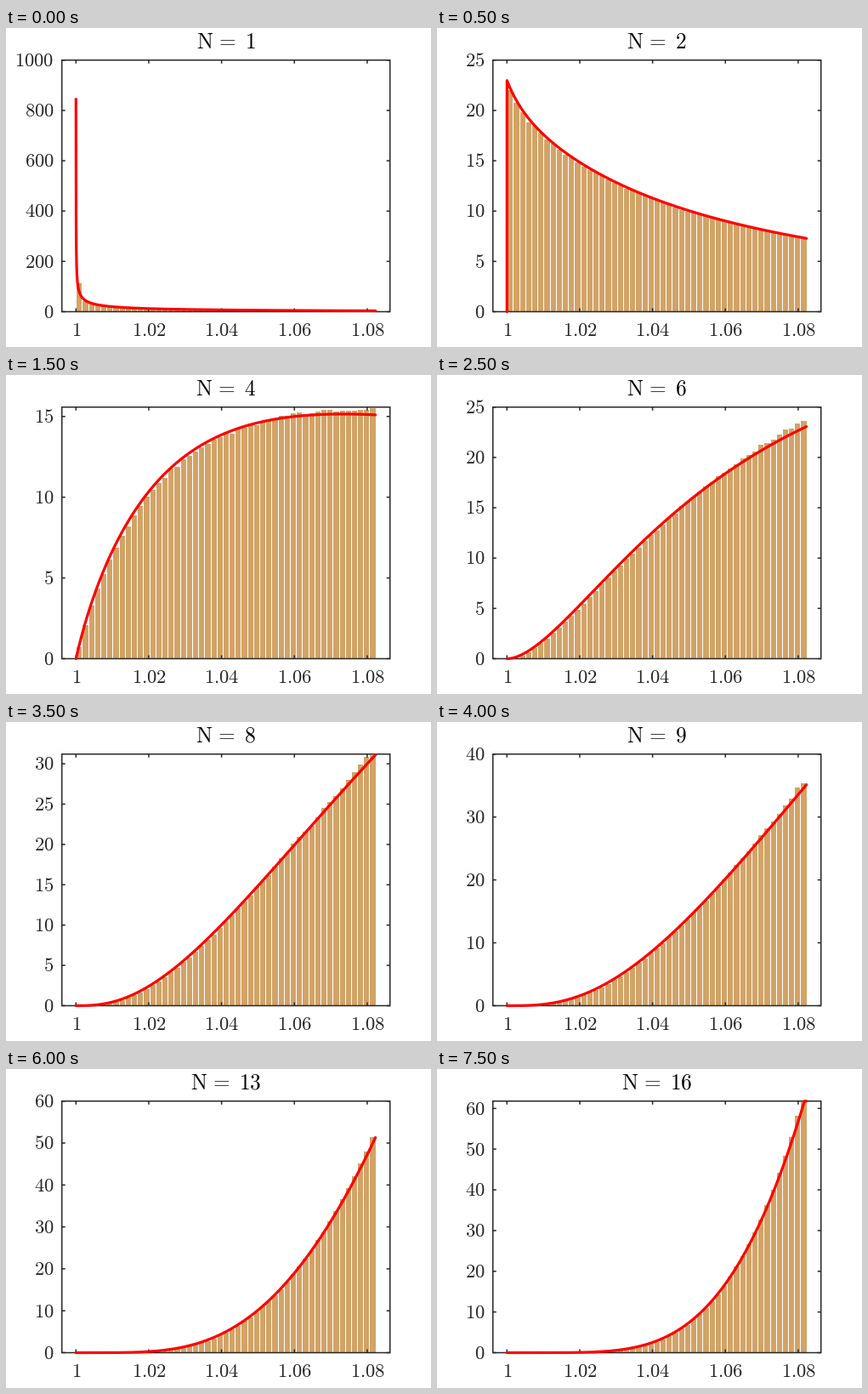
A matplotlib script for the animation above (8 s loop, 500x375 px).

```python
import numpy as np
import matplotlib.pyplot as plt
from matplotlib.animation import FuncAnimation
from matplotlib.patches import Rectangle

plt.rcParams["mathtext.fontset"] = "cm"

W, H, DPI = 500, 375, 100
PX = 72 / DPI
LEFT, RIGHT, TOP, BOTTOM = 65.75, 451.75, 37.75, 333.5
X_ONE, X_SCALE = 82.3, 4283
SPAN, BINS = 0.08227, 49
DARK, TAN, RED = "#262626", "#d2a366", "#ff0000"
BEND = 0.19

# upper limit and tick step of the vertical axis for each N
Y_AXES = {
    1: (1000, 200), 2: (25, 5), 3: (15, 5), 4: (15.58, 5),
    5: (20, 5), 6: (25, 5), 7: (30, 5), 8: (31.2, 5),
    9: (40, 10), 10: (40, 10), 11: (50, 10), 12: (50, 10),
    13: (60, 10), 14: (60, 10), 15: (60, 10), 16: (61.8, 10),
}


def base_density(t):
    """Density for N = 2 at distance t above 1."""
    return 1 / (0.048 + 0.98 * t + 1.5 * t**2 - 0.004 * np.exp(-t / 0.005))


# fine grid, denser near zero
t = SPAN * np.linspace(0, 1, 3001) ** 2
base = base_density(t)
cum = np.concatenate([[0], np.cumsum(np.diff(t) * (base[1:] + base[:-1]) / 2)])
base /= cum[-1]
cum /= cum[-1]
# squared radius, scaled to reach 1 at the end of the span
g = (1 - np.sqrt(1 - 2 * BEND * (1 - BEND / 2) * cum)) / BEND


def norm(n):
    return 1 / (2 / n - 2 * BEND / (n + 2))


def curve(n):
    """Points of the density line."""
    keep = t > 8.6e-6
    y = norm(n) / norm(2) * g[keep] ** (n / 2 - 1) * base[keep]
    if n == 1:
        return np.append(0, t[keep]), np.append(845, np.minimum(y, 845))
    return np.append(0, t[keep]), np.append(0, y)


def bars(n):
    """Bin edges and sampled histogram heights."""
    edges = np.linspace(0, SPAN, BINS + 1)
    ge = np.interp(edges, t, g)
    cdf = norm(n) * (2 / n * ge ** (n / 2) - 2 * BEND / (n + 2) * ge ** (n / 2 + 1))
    rng = np.random.default_rng(n)
    tilt = 0.033 * min(1, (n - 1) / 4) * np.linspace(-1, 1, BINS)
    noise = rng.normal(0, 0.005, BINS)
    return edges, np.diff(cdf) / np.diff(edges) * (1 + tilt + noise)


def to_x(v):
    return X_ONE + X_SCALE * v


fig = plt.figure(figsize=(W / DPI, H / DPI), dpi=DPI, facecolor="white")
ax = fig.add_axes([0, 0, 1, 1])


def segment(xs, ys):
    ax.plot(xs, ys, color=DARK, lw=1.5 * PX, solid_capstyle="butt",
            snap=False, zorder=3)


def label(x, y, text, ha, em=22.5, color=DARK):
    ax.text(x, y, f"${text}$", ha=ha, va="baseline", fontsize=em * PX, color=color)


def draw(i):
    n = i + 1
    limit, step = Y_AXES[n]

    def to_y(v):
        return BOTTOM - (BOTTOM - TOP) * np.minimum(v, limit) / limit

    ax.clear()
    ax.set(xlim=(0, W), ylim=(H, 0))
    ax.axis("off")

    edges, heights = bars(n)
    tops = to_y(heights)
    ax.bar(to_x(edges[:-1]), tops - BOTTOM, np.diff(edges) * X_SCALE, bottom=BOTTOM,
           align="edge", color=TAN, edgecolor="white", linewidth=1 * PX, zorder=2)

    ax.add_patch(Rectangle((LEFT, TOP), RIGHT - LEFT, BOTTOM - TOP, fill=False,
                           ec=DARK, lw=1.5 * PX, snap=False, zorder=3))
    for k in range(5):
        x = to_x(0.02 * k)
        segment([x, x], [BOTTOM, BOTTOM - 4])
        segment([x, x], [TOP, TOP + 4])
        label(x + 0.2, 362.5, f"{1 + 0.02 * k:.2f}" if k else "1", "center")
    for v in range(0, int(limit) + 1, step):
        y = to_y(v)
        segment([LEFT, LEFT + 4], [y, y])
        segment([RIGHT, RIGHT - 4], [y, y])
        label(56.5, y + 7.3, str(v), "right")

    tx, ty = curve(n)
    ax.plot(to_x(tx), to_y(ty), color=RED, lw=3.2 * PX, solid_capstyle="round",
            solid_joinstyle="round", zorder=4)

    label(258.8, 24, rf"\mathrm{{N}}\hspace{{0.13}}=\hspace{{0.3}}{n}",
          "center", 25.4, "black")
    return []


anim = FuncAnimation(fig, draw, frames=16, interval=500, init_func=lambda: [],
                     repeat=True, repeat_delay=0)
plt.show()
```
